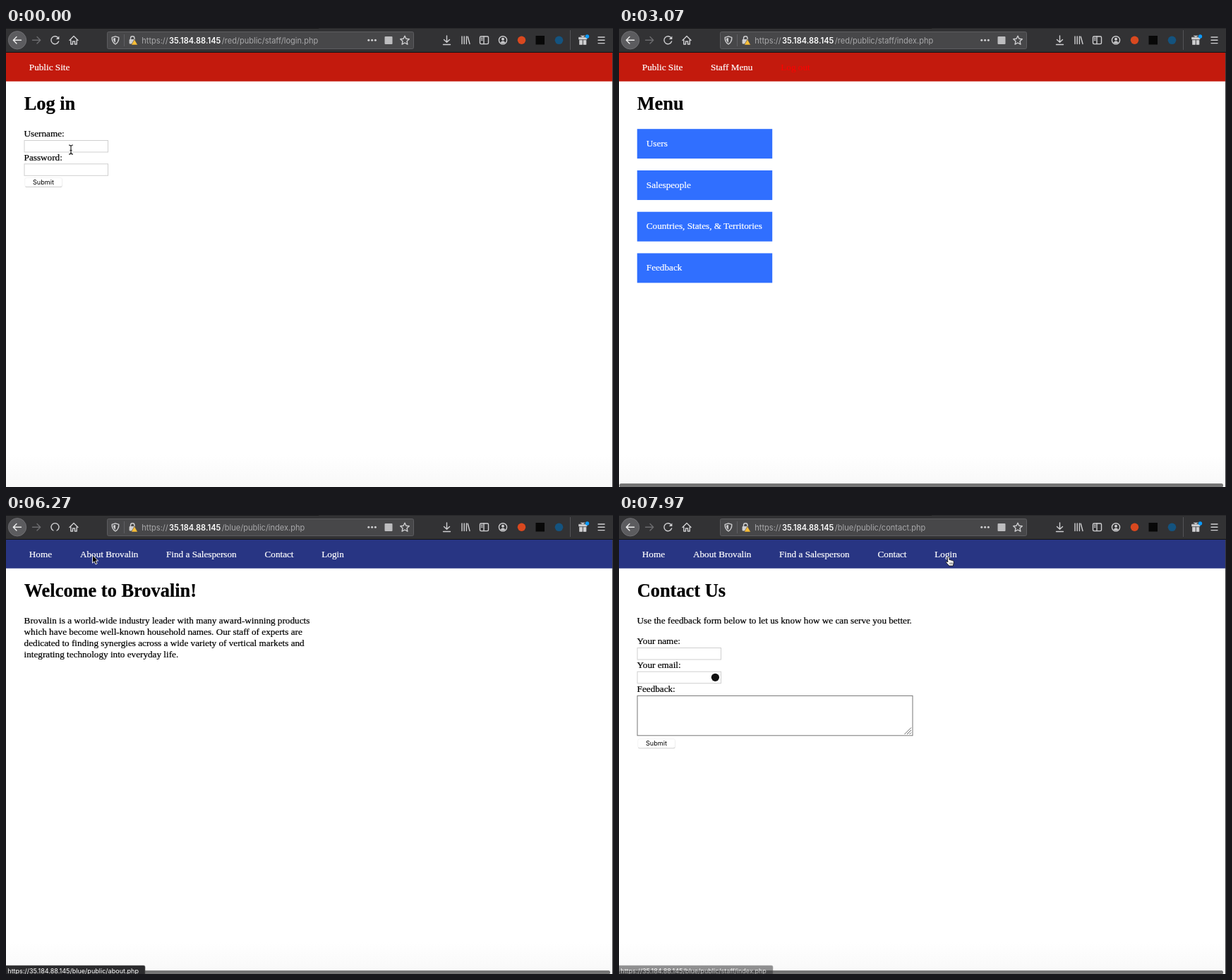
These frames come from a looping animation (860x651 px, 8000 ms). An HTML page:

```html
<!DOCTYPE html>
<html lang="en">
<head>
<meta charset="utf-8">
<title>Staff site walkthrough</title>
<style>
  html, body { margin: 0; width: 100%; height: 100%; overflow: hidden; background: #fff; }
  svg { display: block; width: 860px; height: 651px; }
  .page text { font: 13.2px "Liberation Serif", "Times New Roman", serif; stroke: #000; stroke-width: .22px; }
  .page text[fill="#fff"] { stroke: #fff; }
  .page text[fill="#f00"] { stroke: none; }
  .page .h1 { font-size: 26.4px; font-weight: bold; }
  .page .h2 { font-size: 19.8px; font-weight: bold; }
  .page .ui, #popup text { font: 9.1px Inter, sans-serif; stroke: none; }
  #bar text { font: 11.05px Inter, sans-serif; }
  #bar .host { font-weight: 600; }
  #status text { font: 9.05px Inter, sans-serif; fill: #fff; }
  .icon { fill: none; stroke: #cfcfd1; stroke-width: 1.4; stroke-linecap: round; stroke-linejoin: round; }
</style>
</head>
<body>
<svg id="stage" viewBox="0 0 860 651" xmlns="http://www.w3.org/2000/svg"></svg>
<script>
const LOOP = 8000;
const HOST = '35.184.88.145';
const FIRM = 'Brovalin';
const USER = 'tsample';

const text = (x, y, s, attrs = '') => `<text x="${x}" y="${y}" ${attrs}>${s}</text>`;
const rect = (x, y, w, h, fill, attrs = '') =>
  `<rect x="${x}" y="${y}" width="${w}" height="${h}" fill="${fill}" ${attrs}/>`;
const circle = (x, y, r, fill, attrs = '') => `<circle cx="${x}" cy="${y}" r="${r}" fill="${fill}" ${attrs}/>`;
const path = (d, attrs = 'class="icon"') => `<path d="${d}" ${attrs}/>`;
const group = (id, body, attrs = '') => `<g id="${id}" ${attrs}>${body}</g>`;

// Page building blocks
const RED = '#c31a0d', BLUE = '#283583';
const heading = s => text(25.7, 116, s, 'class="h1"');
const field = (y, fill = '#fff', stroke = '#cfcfcf') =>
  rect(26, y, 118.5, 16.5, fill, `stroke="${stroke}"`);
const lines = (y, list) => list.map((s, i) => text(25.6, y + i * 15.82, s)).join('');
const submit = y => rect(27, y + 0.7, 52.5, 13, '#c4c4c4', 'rx="2.5"') +
  rect(26.7, y, 52.8, 12.7, '#fff', 'rx="2.5" stroke="#ededed" stroke-width=".6"') +
  text(53, y + 9.6, 'Submit', 'class="ui" text-anchor="middle"');
const nav = (color, items) => rect(0, 35, 859, 40.7, color) +
  items.map(([x, s, fill = '#fff']) => text(x, 60, s, `fill="${fill}"`)).join('');
const siteNav = nav(BLUE, [[32.8, 'Home'], [105, 'About ' + FIRM], [227, 'Find a Salesperson'],
  [366.5, 'Contact'], [447.3, 'Login']]);

const dots = Array.from({ length: 12 }, (_, i) => circle(30.6 + i * 4.33, 202, 1.35, '#111')).join('');
const login = (color, extra = '') => nav(color, [[32.8, 'Public Site']]) + heading('Log in') +
  text(25.6, 154.3, 'Username:') + field(159.5) + text(25.6, 188, 'Password:') + field(192.8) +
  submit(212.3) + extra;
const filled = field(159.5, '#fffbb9', '#cfcb9a') + field(192.8, '#fffbb9', '#cfcb9a') +
  text(28.5, 171.2, USER, 'class="ui"') + dots;

const menu = ['Users', 'Salespeople', 'Countries, States, &amp; Territories', 'Feedback'].map((s, i) =>
  rect(25.7, 143.2 + i * 58.75, 191.5, 42, '#306fff') +
  text(38.8, 167.8 + i * 58.75, s, 'fill="#fff"')).join('');

const about = heading('About ' + FIRM) +
  lines(154.3, [
    `${FIRM} started as a small company with a different name. Ostermoor Seed`,
    'Corporation was founded in 1880 by Elmar Kvistrup, a wheat farmer in',
    'Western Minnesota. Elmar and his three sons expanded their family business',
    'over the next four decades to become a market leader across a wide number',
    'of agricultural markets.']) +
  lines(246.9, [
    'Beginning in 1925, OstSeed began acquiring a number of competitors to',
    'gain access to key patents. These patents allowed OstSeed to push',
    'aggressively into exciting new markets. The company merged with The Q.L.',
    'Tramway and Wheel Company in 1940 to become Dunvex Utilities, Inc. The',
    'larger enterprise was one of the first companies listed on the Fen Harle',
    'Mercantile Measure.']) +
  lines(355.2, [
    `In 1981, the company rebranded itself as ${FIRM}. The firm employs over`,
    '80,000 people in the United States and another 20,000 across 30 other',
    'countries.']) +
  rect(25.6, 404.5, 807, 1.2, '#222') + text(25.6, 439.5, 'Headquarters', 'class="h2"') +
  [[25.6, 'New York', '518 Plum Hill Street'], [160.6, 'London', '407C Morrow Street, ZQ8'],
   [320, 'Hong Kong', '61 Lanterby Road, Yamtoun']]
    .map(([x, city, street]) => text(x, 487.3, city) + text(x, 503.1, street)).join('');

const contact = heading('Contact Us') +
  text(25.6, 154.3, 'Use the feedback form below to let us know how we can serve you better.') +
  text(25.6, 183.3, 'Your name:') + field(188.5) + text(25.6, 217, 'Your email:') + field(222.2) +
  circle(136.4, 230.3, 5.6, '#111') + text(25.6, 250.6, 'Feedback:') +
  rect(26, 256.4, 390, 56.4, '#fff', 'stroke="#777"') +
  path('M404.5 311L414 301.5M408 311L414 305M411.5 311L414 308.5', 'stroke="#555" stroke-width=".9"') +
  submit(317.6);

const pages = {
  redLogin: ['/red/public/staff/login.php', login(RED, group('filled', filled))],
  redMenu: ['/red/public/staff/index.php', nav(RED, [[32.8, 'Public Site'], [130, 'Staff Menu'],
    [229.3, 'Log out', '#f00']]) + heading('Menu') + menu],
  blueLogin: ['/blue/public/staff/login.php', login(BLUE)],
  home: ['/blue/public/index.php', siteNav + heading(`Welcome to ${FIRM}!`) + lines(154.3, [
    `${FIRM} is a world-wide industry leader with many award-winning products`,
    'which have become well-known household names. Our staff of experts are',
    'dedicated to finding synergies across a wide variety of vertical markets and',
    'integrating technology into everyday life.'])],
  about: ['/blue/public/about.php', siteNav + about],
  territories: ['/blue/public/territories.php', siteNav + heading('Find a Salesperson')],
  contact: ['/blue/public/contact.php', siteNav + contact]
};

const popup = field(159.5, '#fff', '#5b9cf0') +
  rect(25, 177, 170, 97, '#fff', 'stroke="#bbb" stroke-width=".8" filter="url(#soft)"') +
  rect(25.5, 177.5, 169, 33, '#e3e3e6', 'id="choice"') +
  [USER, 'rsample'].map((s, i) => text(33, 191 + i * 33, s) +
    text(33, 203 + i * 33, 'From this website', 'fill="#777"')).join('') +
  rect(25.5, 244, 169, 29.5, '#ededf0') + text(33, 262, 'View Saved Logins');

// Toolbar
const reload = {
  reload: path('M74.2 14.5A5.5 5.5 0 1 0 74.6 19') + path('M75.4 11.4V16H70.8Z', 'fill="#cfcfd1"'),
  ring: path('M67 22A5.5 5.5 0 1 1 72 22'),
  slash: path('M64.3 12.5L74 22'),
  stop: path('M64.3 12.5L74 22M74 12.5L64.3 22')
};
const toolbar = rect(0, 0, 860, 35, '#323234') + rect(0, 0, 443, 1, '#19191a') +
  rect(443, 0, 417, 1, '#262628') + rect(0, 34, 860, 1, '#121213') +
  circle(16, 17.3, 12.7, '#5c5c5f', 'stroke="#77777a" stroke-width=".8"') +
  path('M21.5 17.3H10.5M15 12.6L10.3 17.3L15 22', 'class="icon" style="stroke:#eee"') +
  path('M37.5 17.3H48.5M44 12.6L48.7 17.3L44 22', 'class="icon" style="stroke:#6c6c6f"') +
  Object.entries(reload).map(([k, s]) => group('re-' + k, s)).join('') +
  path('M90 17.5L96 11.6L102 17.5M91.8 17V23H94.5V19H97.5V23H100.2V17') +
  rect(143.5, 5.5, 434, 24, '#474749', 'rx="2" stroke="#5d5d60"') +
  rect(167, 9, 1, 17, '#606063') +
  path('M155 11.8L159.8 13.3C160 18 158.5 21 155 23C151.5 21 150 18 150.2 13.3Z') +
  path('M155 13.9V21C153 19.5 152 17.5 152 14.8Z', 'fill="#cfcfd1"') +
  path('M176.5 16V14.5A2.7 2.7 0 0 1 182 14.5V16') + rect(174.6, 16, 8, 6.6, '#cfcfd1', 'rx="1"') +
  path('M182 16L186.5 24H177.5Z', 'fill="#ffbf36" stroke="#474749" stroke-width=".6"') +
  text(192.3, 22, 'https://', 'fill="#a8a8aa"') + text(231, 22, HOST, 'class="host" fill="#fff"') +
  text(305.8, 22, '', 'id="url" fill="#a8a8aa"') +
  group('reader', rect(479.5, 11.5, 11, 12, 'none', 'rx="1.5" class="icon"') +
    path('M482 14.8H488M482 17.4H488M482 20H486') + rect(502, 9, 1, 17, '#606063')) +
  [513.8, 518.6, 523.4].map(x => circle(x, 17.3, 1.5, '#cfcfd1')).join('') +
  rect(536.5, 12, 11, 11, '#bdbdbf', 'rx="1"') +
  path('M565 11.2L566.9 15.3L571.3 15.8L568 18.8L568.9 23.2L565 21L561.1 23.2L562 18.8L558.7 15.8L563.1 15.3Z') +
  path('M624.5 11V20M620.5 16.5L624.5 20.3L628.5 16.5M619.5 23.5H629.5') +
  path('M646 12V22.5M649.2 12V22.5M652.4 12V22.5M654.2 12.3L657 22.5') +
  rect(671.5, 12, 12, 10.6, 'none', 'rx="1.5" class="icon"') + path('M677 12V22.5M673.5 14.5H675M673.5 17H675') +
  circle(704, 17.3, 5.6, 'none', 'class="icon"') + circle(704, 15.8, 2, '#cfcfd1') +
  path('M700.5 20.5Q704 16.5 707.5 20.5Q704 23 700.5 20.5Z', 'fill="#cfcfd1"') +
  circle(730.5, 17.3, 5.7, '#d9481f') + rect(750.5, 11, 12.5, 12.5, '#080808') +
  circle(783.5, 17.3, 5.8, '#14537f') + rect(799, 3, 1, 28, '#545457') +
  path('M811.5 13.2H823V16H811.5ZM812.5 17.2H816.5V23.5H812.5ZM818 17.2H822V23.5H818ZM814 10.8L817.2 13L820.3 10.8', 'fill="#cfcfd1" stroke="#cfcfd1" stroke-width=".6"') +
  circle(823.5, 12, 2.7, '#0a9bff') +
  path('M839 13H848M839 17.3H848M839 21.6H848');

// Pointers, each with its hot point at the origin
const pointers = {
  beam: path('M-3 -6Q0 -6 0 -4Q0 -6 3 -6M0 -4V5M-3 7Q0 7 0 5Q0 7 3 7M-1.5 1.5H1.5', 'fill="none" stroke="#111" stroke-width="1.1"'),
  arrow: path('M0 0V11.2L2.6 8.8L4.5 13L6.6 12L4.7 8H8.2Z', 'fill="#000" stroke="#fff" stroke-width=".9"'),
  hand: path('M-1.4 1.8C-1.4 .4 .9 .3 1 1.8L1.6 5.4C2.3 4.7 3.6 4.9 3.8 5.8C4.6 5.3 5.6 5.6 5.8 6.4C6.8 6 7.6 6.5 7.7 7.4C8 9.8 7.1 11 6.9 13.6H1C.6 12 -2.6 9.8 -3.2 8.4C-3.2 7.3 -1.6 7.4 -.5 8.4Z', 'fill="#fff" stroke="#111" stroke-width=".9"') +
    path('M2.3 8.8V11.6M4 8.8V11.6M5.7 8.8V11.6', 'stroke="#111" stroke-width=".6"')
};

document.getElementById('stage').innerHTML =
  `<defs><linearGradient id="fade" x2="0" y2="1"><stop stop-color="#fff"/><stop offset="1" stop-color="#f8f8f8"/></linearGradient>
   <filter id="soft"><feDropShadow dx="0" dy="1" stdDeviation="1.3" flood-opacity=".3"/></filter></defs>` +
  rect(0, 0, 860, 651, '#fff') + rect(0, 606, 860, 45, 'url(#fade)') +
  Object.entries(pages).map(([k, [, body]]) => group('page-' + k, body, 'class="page"')).join('') +
  group('popup', popup) + group('bar', toolbar) + rect(859, 35, 1, 616, '#37373a') +
  rect(0.5, 646, 855.5, 5.5, '#757575', 'id="scroll" rx="2.5"') +
  group('status', path('', 'id="tab" fill="#2b2b2d" stroke="#555" stroke-width=".6"') + text(2.3, 649.5, '')) +
  group('pointer', Object.entries(pointers).map(([k, s]) => group('at-' + k, s)).join(''));

// Timelines: [start time, value...]
const pageTimes = [[0, 'redLogin'], [2130, 'redMenu'], [3330, 'blueLogin'], [5300, 'home'],
  [6400, 'about'], [7030, 'territories'], [7450, 'contact']];
const reloadTimes = [[0, 'reload'], [1940, 'slash'], [2000, 'stop'], [2150, 'ring'], [2220, 'reload'],
  [5100, 'slash'], [5150, 'stop'], [5300, 'ring'], [5380, 'reload'], [6240, 'ring'], [6300, 'stop'],
  [6400, 'slash'], [6440, 'reload'], [6900, 'stop'], [7030, 'ring'], [7100, 'reload'],
  [7350, 'stop'], [7450, 'ring'], [7520, 'reload']];
const kindTimes = [[0, 'beam'], [560, 'arrow'], [4650, 'hand'], [5760, 'arrow'], [5960, 'hand'],
  [6240, 'arrow'], [6570, 'hand'], [7000, 'arrow'], [7130, 'hand'], [7720, 'arrow'], [7850, 'hand']];
const moves = [[0, 92, 172], [500, 92, 172], [800, 85, 195], [1170, 85, 195], [1480, 60, 217],
  [1620, 60, 217], [1950, 182, 186], [2050, 182, 186], [2770, 340, 94], [2900, 340, 94],
  [3060, 400, -20], [3500, 379, -20], [3730, 300, 162], [3970, 300, 162], [4730, 66, 54.5],
  [5700, 66, 54.5], [6050, 122.5, 57], [6330, 122.5, 57], [6620, 249.5, 61], [6950, 249.5, 61],
  [7200, 386, 60], [7670, 386, 60], [7930, 466.5, 58.5]];
// [fade-in, fade-out, width, label]
const link = p => `https://${HOST}/blue/public/${p}.php`;
const hints = [[1780, 2130, 199, HOST], [4820, 5750, 195.5, link('index')], [5980, 6560, 197, link('about')],
  [6560, 7000, 214.5, link('territories')], [7130, 7700, 206, link('contact')],
  [7920, 8200, 218, link('staff/index')]];

const $ = id => document.getElementById(id);
const show = (id, on) => { $(id).style.display = on ? '' : 'none'; };
const current = (list, t) => list.filter(k => k[0] <= t).pop();
const clamp = v => Math.max(0, Math.min(1, v));

function position(t) {
  const i = moves.findIndex(m => m[0] > t);
  if (i < 0) return moves[moves.length - 1].slice(1);
  const [t0, x0, y0] = moves[i - 1], [t1, x1, y1] = moves[i];
  const u = (t - t0) / (t1 - t0), e = u * u * (3 - 2 * u);
  return [x0 + (x1 - x0) * e, y0 + (y1 - y0) * e];
}

function render(t) {
  const page = current(pageTimes, t)[1];
  for (const k in pages) show('page-' + k, k === page);
  $('url').textContent = pages[page][0];
  show('reader', page === 'about');
  show('filled', t >= 900);
  show('popup', t >= 130 && t < 900);
  show('choice', t >= 640);
  show('scroll', (t >= 2150 && t < 3330) || t >= 5300);

  const icon = current(reloadTimes, t)[1];
  for (const k in reload) show('re-' + k, k === icon);

  const hint = hints.find(h => t >= h[0] && t < h[1]);
  show('status', hint);
  if (hint) {
    const [start, end, w, label] = hint;
    const swapped = hints.some(h => h[1] === start), kept = hints.some(h => h[0] === end);
    $('status').style.opacity = Math.min(swapped ? 1 : clamp((t - start) / 100),
      kept ? 1 : clamp((end - t) / 80));
    $('tab').setAttribute('d', `M-1 639H${w - 2}Q${w} 639 ${w} 641V652H-1Z`);
    $('status').querySelector('text').textContent = label;
  }

  const [x, y] = position(t), kind = current(kindTimes, t)[1];
  $('pointer').setAttribute('transform', `translate(${x.toFixed(2)} ${y.toFixed(2)})`);
  for (const k in pointers) show('at-' + k, k === kind);
}

const began = performance.now();
function tick() {
  render((performance.now() - began) % LOOP);
  requestAnimationFrame(tick);
}
tick();
</script>
</body>
</html>
```
